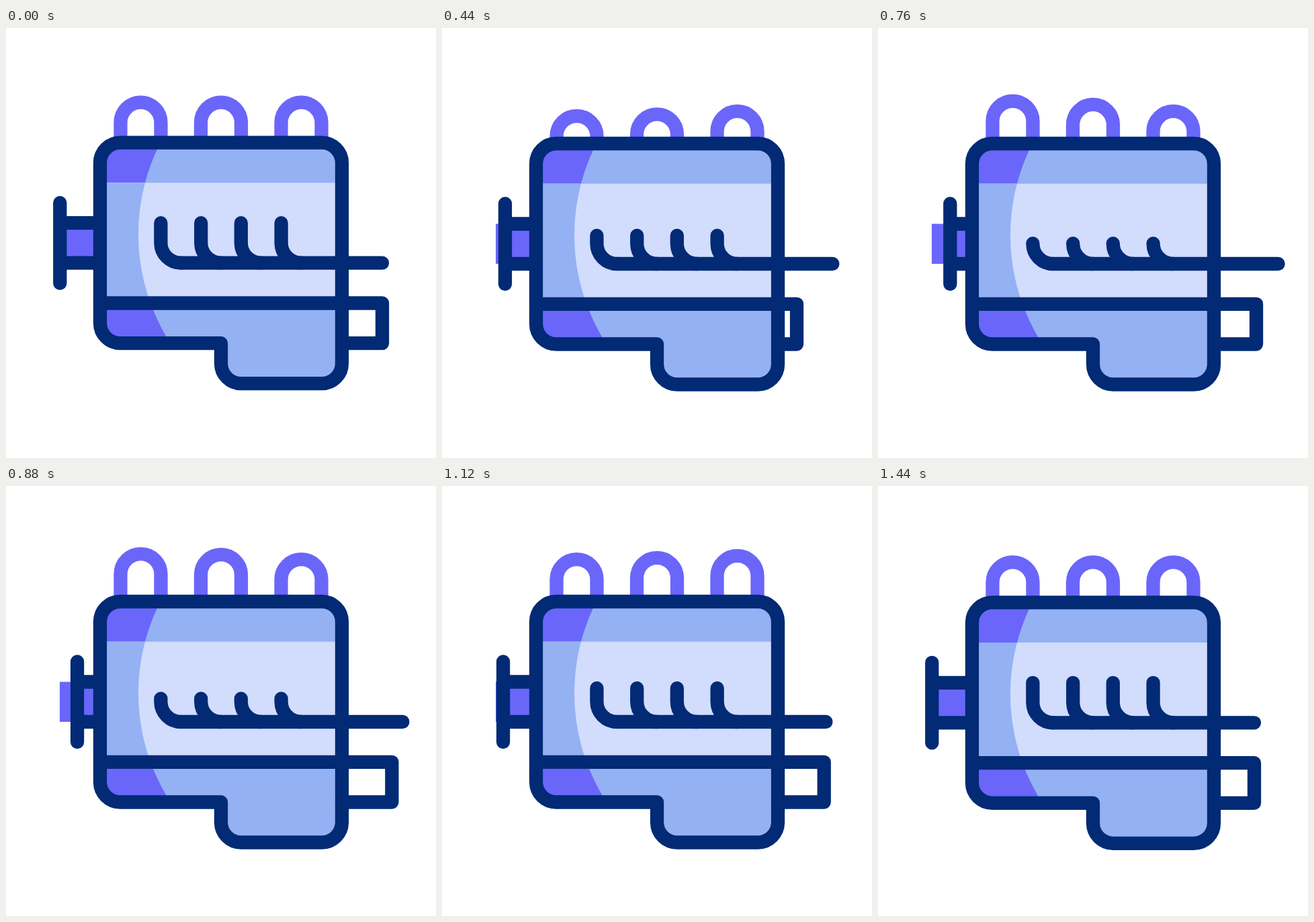
Write an HTML page with a canvas that moves like this. It is 640x640 px and loops after 1.48 s.

```html
<!DOCTYPE html>
<html lang="en">
<head>
<meta charset="utf-8">
<title>Engine</title>
<style>
  html, body { margin: 0; width: 100%; height: 100%; overflow: hidden; background: #fff; }
  canvas { display: block; width: 640px; height: 640px; }
</style>
</head>
<body>
<canvas id="stage" width="640" height="640"></canvas>
<script>
const ctx = document.getElementById('stage').getContext('2d');
const NAVY = '#022a75', PURPLE = '#6a66fa', MID = '#94b1f3', LIGHT = '#d2dcfd';
const LOOP = 1480, STEP = 40;

// Motion tracks: [step, offset] keys with smooth easing between them.
const PIPE = [[2, 0], [18, 36], [34, 0]];
const HOOK = [[2, 0], [18, 29.5], [34, 0]];
const PULLEY = [[2, 0], [20, 27.3], [34, 0]];
const OUTLET = [[2, 0], [11, -32], [23, 15.3], [34, 0]];
const RINGS = [
  { x: 200.5, keys: [[2, 0], [12.4, 20], [22.2, -11], [31, 0]] },
  { x: 320, keys: [[2.8, 0], [14, 20], [23, -11], [32.6, 0]] },
  { x: 439.5, keys: [[4.5, 0], [16, 20], [25, -11], [34, 0]] }
];

// Row positions
const TOP = 170.7, BAND = 230.4, UPPER = 290.2, LOWER = 349.7,
      SILL = 409.5, BASE = 469.2, SUMP = 529.2;

function track(keys, n) {
  if (n <= keys[0][0]) return keys[0][1];
  for (let i = 1; i < keys.length; i++) {
    const [a, from] = keys[i - 1], [b, to] = keys[i];
    if (n < b) {
      const u = (n - a) / (b - a);
      return from + (to - from) * u * u * (3 - 2 * u);
    }
  }
  return keys[keys.length - 1][1];
}

function stroke(path, color = NAVY, cap = 'round') {
  ctx.strokeStyle = color;
  ctx.lineCap = cap;
  ctx.stroke(new Path2D(path));
}

function rect(color, x, y, right, bottom) {
  ctx.fillStyle = color;
  ctx.fillRect(x, y, right - x, bottom - y);
}

const body = `M170 ${TOP}H470A30 30 0 0 1 500 ${TOP + 30}V${SUMP - 30}
  A30 30 0 0 1 470 ${SUMP}H350A30 30 0 0 1 320 ${SUMP - 30}V${BASE}H170
  A30 30 0 0 1 140 ${BASE - 30}V${TOP + 30}A30 30 0 0 1 170 ${TOP}Z`;

function bands(edge, middle) {
  rect(edge, 130, 160, 510, BAND);
  rect(middle, 130, BAND, 510, SILL);
  rect(edge, 130, SILL, 510, 540);
}

function drawBody() {
  ctx.save();
  ctx.clip(new Path2D(body));
  bands(PURPLE, MID);
  ctx.beginPath();
  ctx.arc(497, 307, 300, 0, Math.PI * 2);
  ctx.rect(320, 160, 200, 400);
  ctx.clip();
  bands(MID, LIGHT);
  ctx.restore();
  stroke(body);
}

function drawRing(x, dy) {
  const y = 140.7 + dy;
  stroke(`M${x - 30} ${TOP}V${y}A30 30 0 0 1 ${x + 30} ${y}V${TOP}`, PURPLE, 'butt');
}

function drawPulley(dx) {
  const x = 80.3 + dx;
  rect(PURPLE, 80, UPPER, 140, LOWER);
  stroke(`M${x} 260.2V379.8M${x} ${UPPER}H140M${x} ${LOWER}H140`);
}

function drawManifold(dx, dy) {
  for (const x of [230.4, 290.2, 349.8, 409.6]) {
    stroke(`M${x} ${UPPER + dy}V${LOWER - 30}A30 30 0 0 0 ${x + 30} ${LOWER}`);
  }
  stroke(`M260.4 ${LOWER}H${560 + dx}`);
}

function draw(n) {
  const shake = n < 3 ? 0 : n % 3 ? 1.3 : 2.6;
  ctx.setTransform(1, 0, 0, 1, 0, 0);
  rect('#fff', 0, 0, 640, 640);
  ctx.translate(0, shake);
  ctx.lineWidth = 20.3;
  ctx.lineJoin = 'round';
  for (const ring of RINGS) drawRing(ring.x, track(ring.keys, n));
  drawPulley(track(PULLEY, n));
  drawBody();
  drawManifold(track(PIPE, n), track(HOOK, n));
  stroke(`M140 ${SILL}H${560 + track(OUTLET, n)}V${BASE}H500`);
}

const start = performance.now();
function tick() {
  const t = (performance.now() - start) % LOOP;
  draw(Math.floor(t / STEP));
  requestAnimationFrame(tick);
}
tick();
</script>
</body>
</html>
```
